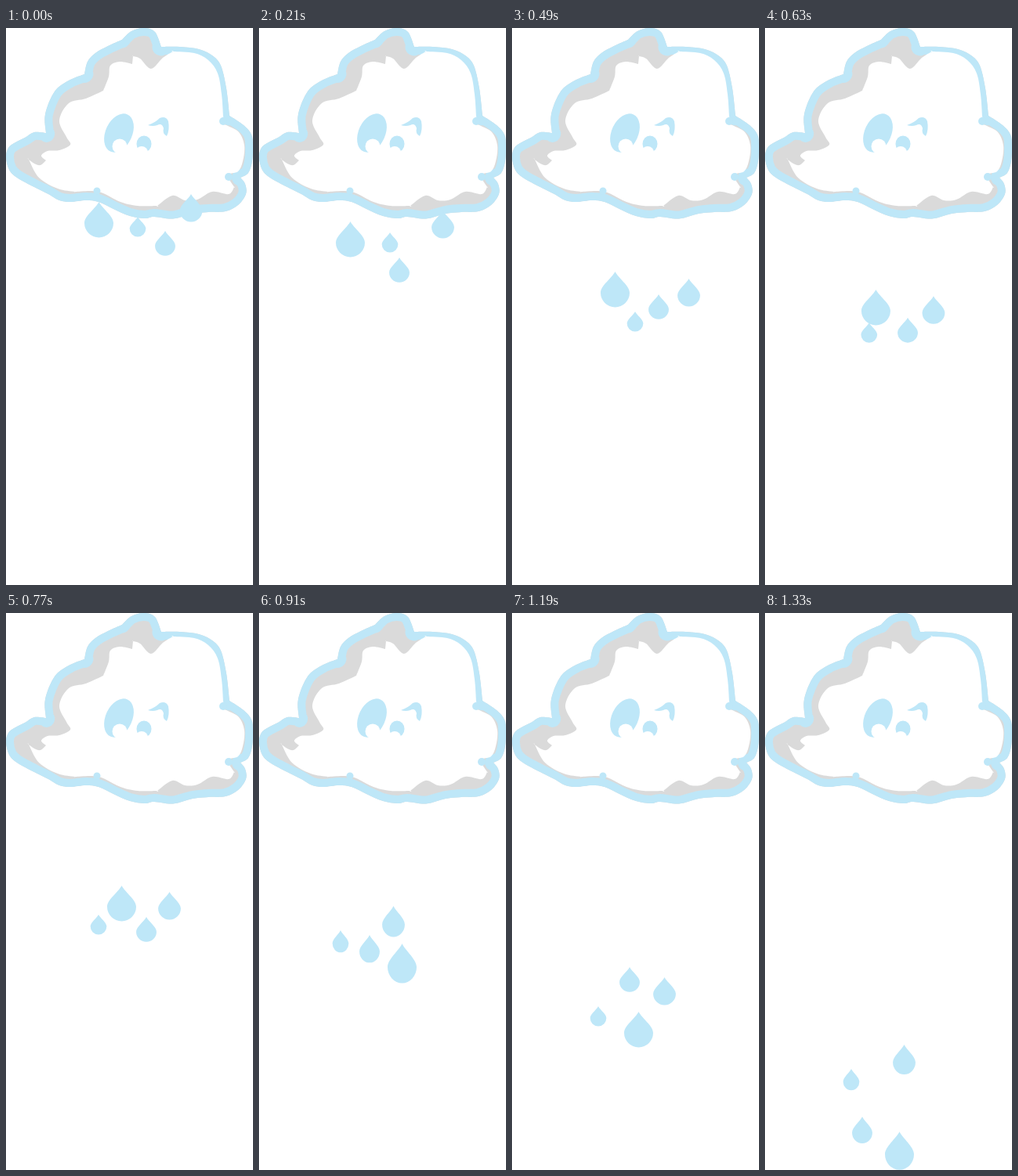
These frames come from a looping animation (315 by 711 pixels, 1.47 s). An HTML page:

```html
<!DOCTYPE html>
<html>
<head>
<meta charset="utf-8">
<style>
html, body { margin: 0; width: 100%; height: 100%; overflow: hidden; background: #fff; }
svg { display: block; width: 100%; height: 100%; }
.blue { fill: #bee7f8; }
.gray { fill: #dadada; }
.white { fill: #fff; }
.rim { fill: none; stroke: #bee7f8; stroke-width: 20; stroke-linejoin: round; }
</style>
</head>
<body>
<svg viewBox="0 0 315 711"></svg>
<script>
const svg = document.querySelector('svg');

// Smooth closed curve through "x,y" points; a trailing "c" makes a sharp corner.
function smooth(text) {
  const pts = text.split(' ').flatMap(s => {
    const p = s.replace('c', '').split(',').map(Number);
    return s.endsWith('c') ? [p, p] : [p];
  });
  const n = pts.length;
  return 'M' + pts[0] + pts.map((p, i) => {
    const before = pts[(i + n - 1) % n], q = pts[(i + 1) % n], after = pts[(i + 2) % n];
    const a = p.map((v, k) => v + (q[k] - before[k]) / 6);
    const b = q.map((v, k) => v - (after[k] - p[k]) / 6);
    return `C${a} ${b} ${q}`;
  }).join('') + 'Z';
}

const outline = smooth('0,165 3,153 12,146 24,140 36,133 51,134c 50,110 62,81 80,67 100,59c ' +
  '104,43 114,32 130,23 148,15c 160,4 176,0 190,5 198,24c 222,24 246,27 263,35 274,48 281,77 285,112c ' +
  '303,124 313,136 315,150 314,170 309,185 299,191c 305,199 306,212 296,226 280,234 258,235 238,237 ' +
  '213,243.5 189,241 177,243 158,240 137,231 118,222 102,220 82,222 68,220 54,212 36,203 14,191 4,181');

const body = smooth('213,30c 240,32 258,41 270,58 275,85 277,113c 275,121 283,125 297,133 304,150 ' +
  '302,170 296,183 283,188 291,203c 284,212 263,209 244,219 228,220 212,214 193,227c 168,227 146,222 ' +
  '118,209 88,209c 66,205 42,191 29,168c 36,173 44,175 51,169c 45,163 53,157 68,156 82,149 ' +
  '77,139 68,118 80,96 102,90 124,80c 131,62 133,48 145,43 161,46c 162,36c 171,39 185,52 200,38');

// The inner half of the rim stroke is kept, so the rim has an even width.
svg.innerHTML = `
  <clipPath id="edge"><path d="${outline}"/></clipPath>
  <path class="gray" d="${outline}"/>
  <path class="rim" d="${outline}" clip-path="url(#edge)"/>
  <path class="white" d="${body}"/>
  <g class="blue">
    <circle cx="277" cy="119" r="5"/>
    <circle cx="284" cy="190" r="5"/>
    <circle cx="116" cy="208" r="4.5"/>
    <ellipse rx="17" ry="26" transform="translate(144 134) rotate(25)"/>
    <ellipse cx="176" cy="148" rx="9.5" ry="10.5"/>
    <path d="M181 124Q190 121 196 115Q204 112 207 119Q209 130 205 138Q199 135 201 128Q199 121 193 124Q187 126 181 124Z"/>
  </g>
  <g class="white">
    <circle cx="145" cy="151" r="9.5"/>
    <circle cx="173" cy="159" r="8"/>
  </g>`;

// Key points of each tip's fall, reached at the shared times
const times = [0, 210, 490, 770, 910, 1190, 1330];
const stretches = [1, 1, 1, 1, 1.11, 1, 1.07];
const drops = [
  [1, '118.5,222 116.5,247 131.5,311 147.5,348 182.5,422 161.5,509 171.5,662'],
  [.56, '168,241 167,261 157,362 118,385 104,405 110,502 110,582'],
  [.7, '203,259 179,293 187,340 179,388 141,411 150,452 124,643'],
  [.78, '236,212 234.5,233 225.5,320 208.5,356 171.5,374 194.5,465 177.5,551']
].map(([size, tips]) => {
  svg.insertAdjacentHTML('beforeend',
    '<path class="blue" d="M0 0C4 8 18.5 18 18.5 27A18.5 18.5 0 0 1-18.5 27C-18.5 18-4 8 0 0Z"/>');
  return { size, node: svg.lastElementChild, tips: tips.split(' ').map(p => p.split(',').map(Number)) };
});

// The picture steps every 70 ms at first, then every 140 ms.
const hold = ms => ms < 350 ? Math.floor(ms / 70) * 70 : Math.floor((ms - 70) / 140) * 140 + 70;

const start = performance.now();
function draw(now) {
  const t = hold(Math.max(0, now - start) % 1470);
  const i = times.findLastIndex(key => key <= t);
  const j = Math.min(i + 1, times.length - 1);
  const k = i === j ? 0 : 1 - (1 - (t - times[i]) / (times[j] - times[i])) ** 1.4;
  const mix = (a, b) => a + (b - a) * k;
  const stretch = mix(stretches[i], stretches[j]);
  for (const { size, node, tips } of drops) {
    const [x, y] = tips[i].map((v, axis) => mix(v, tips[j][axis]));
    node.setAttribute('transform', `translate(${x} ${y}) scale(${size} ${size * stretch})`);
  }
  requestAnimationFrame(draw);
}
draw(start);
</script>
</body>
</html>
```
